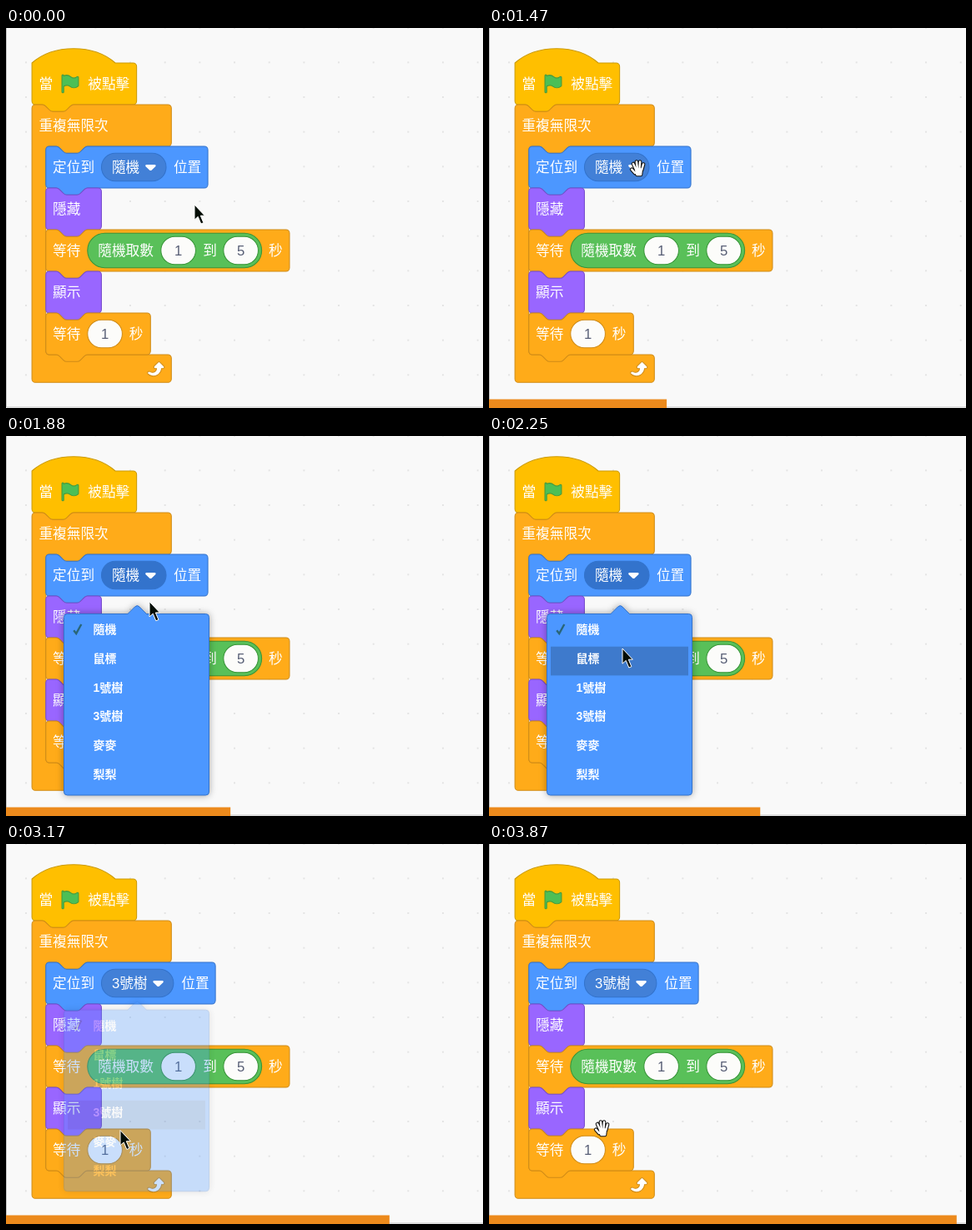
An HTML page that plays this animation: 572x456 px, repeating every 3.95 s.

```html
<!DOCTYPE html>
<html lang="zh-Hant">
<head>
<meta charset="utf-8">
<title>積木程式</title>
<style>
  html, body { margin: 0; width: 100%; height: 100%; overflow: hidden; background: #f9f9f9; }
  svg { display: block; width: 572px; height: 456px; }
  text { font: 16px "Liberation Sans", "Noto Sans CJK TC", "Noto Sans CJK", sans-serif; fill: #fff; }
  .events { fill: #ffbf00; stroke: #cc9900; }
  .control { fill: #ffab19; stroke: #cf8b17; }
  .motion { fill: #4c97ff; stroke: #3373cc; }
  .looks { fill: #9966ff; stroke: #774dcb; }
  .operator { fill: #59c059; stroke: #389438; }
  .input { fill: #fcfcfa; }
  .number { fill: #575e75; text-anchor: middle; }
  #pill { fill: #4280d7; stroke: #3373cc; }
  #pill.open { fill: #3373cc; }
  #menu text { font-size: 14px; font-weight: bold; }
  #panel { filter: drop-shadow(0 0 4px rgba(0, 0, 0, .35)); }
  #arrow { fill: #040d06; stroke: #fff; stroke-width: 1; }
  #hand { fill: none; stroke-linecap: round; stroke-linejoin: round; }
</style>
</head>
<body>
<svg viewBox="0 0 572 456">
  <defs>
    <pattern id="grid" x="3.2" y="20.5" width="41.667" height="41.667" patternUnits="userSpaceOnUse">
      <rect x="20" y="20" width="1.6" height="1.6" fill="#d9d9d9"/>
    </pattern>
    <path id="fingers" d="M-5.5-5.5-2.5 1M-1.6-8-.6 0M2.6-8 2 0M6.6-5 4.6 2M-7.3 1.2-3.5 5.5M-2.5 1H4.3L3.5 7.5H-1Z"/>
  </defs>
  <rect width="572" height="456" fill="#f9f9f9"/>
  <rect width="572" height="456" fill="url(#grid)"/>
  <path d="M.5 0V455H572" fill="none" stroke="#c4c4c4"/>
  <g id="blocks" transform="translate(31.1 42) scale(1.0417)"></g>
  <rect id="bar" y="445.5" height="10.5" fill="#ec8a1c"/>
  <g id="menu">
    <g id="panel" class="motion">
      <rect x="69.5" y="213.5" width="174" height="217.5" rx="4"/>
      <path d="M145.5 214 154.5 205Q157.3 202.2 160.1 205L169 214"/>
    </g>
    <rect id="highlight" x="74" width="165" height="34.7" fill="#3e7acc"/>
    <path d="M81.2 233.2 84.2 237 90.3 226" fill="none" stroke="#2a6678" stroke-width="2.4"/>
  </g>
  <g id="cursor">
    <path id="arrow" d="M0 0V18.2L4.2 14.4 7.8 23 10.9 21.7 7.3 13.2H12.4Z"/>
    <g id="hand">
      <use href="#fingers" stroke="#111" stroke-width="4.6"/>
      <use href="#fingers" stroke="#fff" stroke-width="2.5" fill="#fff"/>
    </g>
  </g>
</svg>
<script>
const $ = id => document.getElementById(id);
const show = (id, on) => $(id).setAttribute('visibility', on ? 'visible' : 'hidden');

// Block outlines, in workspace units
const NOTCH = 'c2 0 3 1 4 2l4 4c1 1 2 2 4 2h12c2 0 3-1 4-2l4-4c1-1 2-2 4-2';
const TAB = 'c-2 0-3 1-4 2l-4 4c-1 1-2 2-4 2h-12c-2 0-3-1-4-2l-4-4c-1-1-2-2-4-2';
const TOP = `M0 4A4 4 0 0 1 4 0H12${NOTCH}`;
const corner = (dx, dy, sweep = 1) => `a4 4 0 0 ${sweep} ${dx} ${dy}`;
const right = (w, h) => `H${w - 4}${corner(4, 4)}v${h - 8}${corner(-4, 4)}`;
const base = `H48${TAB}H4${corner(-4, -4)}z`;
const stackPath = w => TOP + right(w, 48) + base;
const hatPath = w => `M0 0c25-22 71-22 96 0${right(w, 48)}${base}`;
const loopPath = (w, inner) => TOP + right(w, 48) + `H64${TAB}h-8${corner(-4, 4, 0)}v${inner - 8}` +
  corner(4, 4, 0) + right(w, 32) + `H4${corner(-4, -4)}z`;

const label = (x, s, id = '') => `<text id="${id}" x="${x}" y="30">${s}</text>`;
const oval = (x, w, h, attrs) =>
  `<rect x="${x}" y="${24 - h / 2}" width="${w}" height="${h}" rx="${h / 2}" ${attrs}/>`;
const number = (x, n) => oval(x, 40, 32, 'class="input"') +
  `<text class="number" x="${x + 20}" y="30">${n}</text>`;
const block = (x, y, kind, path, content) => `<g transform="translate(${x} ${y})" class="${kind}">
  <path d="${path}"/>${content.replaceAll('<text', '<text stroke="none"')}</g>`;

const flag = `<path transform="translate(32 12)" fill="#4cbf56" stroke="#45993d" d="M20.8 3.7c-.4-.2-.9-.1-1.2.2-2
  1.6-4.8 1.6-6.8 0-2.3-1.9-5.6-2.3-8.3-1v-.4c0-.6-.5-1-1-1s-1 .4-1 1v18.8c0 .5.5 1 1 1h.1c.5 0 1-.4 1-1v-6.4c1-.7
  2.1-1.2 3.4-1.3 1.2 0 2.4.4 3.4 1.2 2.9 2.3 7 2.3 9.8 0 .3-.2.4-.5.4-.9V4.7c0-.5-.3-.9-.8-1z"/>`;
const loopArrow = `<path transform="translate(129 292)" fill="#fff" d="M23.3 11c-.3.6-.9 1-1.5 1h-1.6c-.1 1.3-.5
  2.5-1.1 3.6-.9 1.7-2.3 3.2-4.1 4.1-1.7.9-3.6 1.2-5.5.9-1.8-.3-3.5-1.1-4.9-2.3-.7-.7-.7-1.9 0-2.6.6-.6 1.6-.7
  2.3-.2 1 .6 2 .9 3 .9s1.9-.3 2.7-.9c1.1-.8 1.8-2.1 1.8-3.5h-1.5c-.9 0-1.7-.7-1.7-1.7 0-.4.2-.9.5-1.2l4.4-4.4c.7-.6
  1.7-.6 2.4 0L23 9.2c.5.5.6 1.2.3 1.8z"/>`;
const caret = `<path id="caret" fill="#fff" stroke="none"
  d="M1.6 0H10.8Q13 .4 11.7 2.2L7.5 6.3Q6.2 7.3 4.9 6.3L.7 2.2Q-.6 .4 1.6 0Z"/>`;

$('blocks').innerHTML = [
  block(0, 0, 'events', hatPath(120.5), label(8, '當') + flag + label(64.5, '被點擊')),
  block(0, 48, 'control', loopPath(160.5, 240), label(8, '重複無限次') + loopArrow),
  block(16, 96, 'motion', stackPath(186.5),
    label(8, '定位到') + oval(64, 74.5, 32, 'id="pill"') + label(76, '隨機', 'choice') + caret + label(147, '位置', 'suffix')),
  block(16, 144, 'looks', stackPath(64), label(8, '隱藏')),
  block(16, 192, 'control', stackPath(280.5), label(8, '等待') +
    `<g class="operator">${oval(48, 200.5, 40, '')}${label(60, '隨機取數')}${number(132.5, 1)}${label(181, '到')}${number(204.5, 5)}</g>` +
    label(256.5, '秒')),
  block(16, 240, 'looks', stackPath(64), label(8, '顯示')),
  block(16, 288, 'control', stackPath(120.5), label(8, '等待') + number(48, 1) + label(96, '秒')),
].join('');
const motionBlock = document.querySelector('#blocks .motion > path');

const ROW = 34.7, ROWS_TOP = 215;
$('menu').insertAdjacentHTML('beforeend', ['隨機', '鼠標', '1號樹', '3號樹', '麥麥', '梨梨']
  .map((s, i) => `<text x="104.5" y="${ROWS_TOP + ROW * (i + .5) + 5}">${s}</text>`).join(''));

function setChoice(picked) {
  $('choice').textContent = picked ? '3號樹' : '隨機';
  $('pill').setAttribute('width', picked ? 83 : 74.5);
  $('caret').setAttribute('transform', `translate(${picked ? 123.2 : 114.4} 21)`);
  $('suffix').setAttribute('x', picked ? 156 : 147);
  motionBlock.setAttribute('d', stackPath(picked ? 195.2 : 186.5));
}

const LOOP = 3950, OPEN = 1470, CLOSE = 3064, FADE = 250;
const spans = [[70, 540], [610, 1080], [1150, 1620], [1710, 2170], [2250, 2710], [2790, 3250], [3340, 3800]];
const steps = [0, ...spans.flatMap(([a, b]) =>
  Array.from({ length: 7 }, (_, k) => Math.round((a + (b - a) * k / 6) / 10) * 10)), 3870];

// Cursor way points: time, x, y
const route = [[0, 226, 212], [540, 226, 212], [920, 178.5, 168.5], [1650, 178.5, 168.5],
  [2250, 160, 255], [2710, 137, 343.5], [3260, 137, 343.5], [3340, 135.5, 341.5], [LOOP, 135.5, 341.5]];

function cursorAt(t) {
  const k = route.findIndex(p => p[0] > t);
  const [t0, x0, y0] = route[k - 1], [t1, x1, y1] = route[k];
  const u = (t - t0) / (t1 - t0);
  return [x0 + (x1 - x0) * u, y0 + (y1 - y0) * u];
}

// cubic-bezier(.25, .1, .25, 1)
function ease(x) {
  if (x <= 0 || x >= 1) return x <= 0 ? 0 : 1;
  const curve = (s, a, b) => 3 * (1 - s) ** 2 * s * a + 3 * (1 - s) * s * s * b + s ** 3;
  let lo = 0, hi = 1;
  for (let n = 0; n < 20; n++) {
    const mid = (lo + hi) / 2;
    if (curve(mid, .25, .25) < x) lo = mid; else hi = mid;
  }
  return curve(lo, .1, 1);
}

function draw(step) {
  const t = steps[step];
  const [x, y] = cursorAt(t);
  const shown = ease((t - OPEN) / FADE) - ease((t - CLOSE) / FADE);
  const menuOpen = t >= OPEN && t < CLOSE + FADE;
  const row = Math.floor((y - ROWS_TOP - 3) / ROW);
  const hand = !menuOpen && (y < 192 || t > CLOSE);

  $('bar').setAttribute('width', 572 * step / steps.length);
  $('menu').setAttribute('opacity', shown);
  $('menu').setAttribute('transform', `translate(0 ${-20 * (1 - shown)})`);
  $('highlight').setAttribute('y', ROWS_TOP + 3 + ROW * row);
  show('highlight', row >= 0 && menuOpen);
  $('pill').classList.toggle('open', t >= OPEN && t < CLOSE);
  setChoice(t >= CLOSE);
  $('cursor').setAttribute('transform', `translate(${x} ${y})`);
  show('hand', hand);
  show('arrow', !hand);
}

const start = performance.now();
let current = -1;
function tick() {
  const t = (performance.now() - start) % LOOP;
  const step = steps.findLastIndex(s => s <= t);
  if (step !== current) draw(current = step);
  requestAnimationFrame(tick);
}
tick();
</script>
</body>
</html>
```
